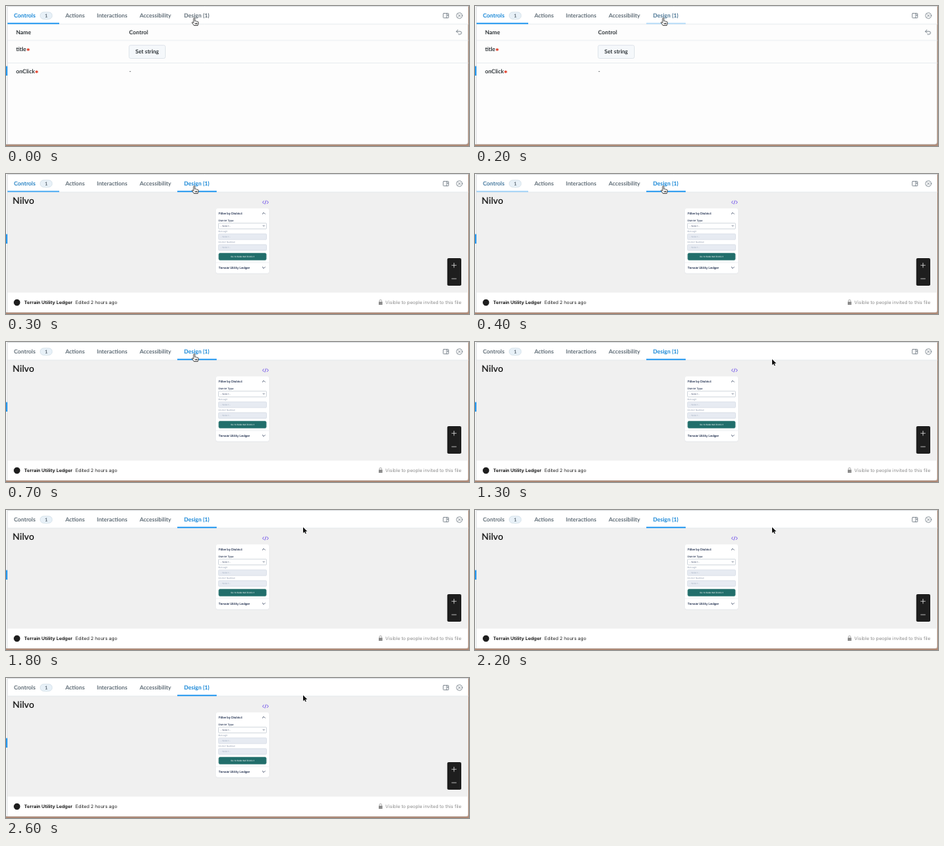
Recreate the animation shown at these times as an HTML page. Size 600 by 183 pixels, loop 2700 ms.

```html
<!DOCTYPE html>
<html lang="en">
<head>
<meta charset="utf-8">
<title>Addon panel</title>
<style>
  html, body { margin: 0; width: 100%; height: 100%; overflow: hidden; background: #fff; }
  svg { display: block; width: 600px; height: 183px; text-rendering: geometricPrecision; }
  .ui { font: 700 7.4px Lato, "Open Sans", sans-serif; fill: #2e3438; }
  .tabs { fill: #5f6c76; }
  .button { font-size: 7.2px; }
  .count { font-size: 6.4px; }
  .brand { font: 600 12px Lato, sans-serif; fill: #111; }
  .card { font: 600 4px Inter, sans-serif; fill: #1b2a4a; }
  .small { font-size: 3.15px; }
  .tiny { font-size: 2.9px; font-weight: 400; }
  .foot { font: 400 6.1px Inter, sans-serif; fill: #222; }
  .line { fill: none; stroke-linecap: round; stroke-linejoin: round; }
</style>
</head>
<body>
<svg viewBox="0 0 600 183">
  <rect width="600" height="183" fill="#b08a76"/>
  <path d="M0 0H599V178Q599 181 596 181H0Z" fill="#fdfdfd"/>
  <path d="M0 181H596Q599 181 599 178V0" class="line" stroke="#a0958f" stroke-width=".6"/>
  <rect x="2" width="597" height="24" fill="#fff"/>
  <path d="M1.7 180.6V.5H599" class="line" stroke="#d3d7da" stroke-width=".8"/>

  <g id="controlsView" class="ui">
    <path d="M2 45H599M2 74.5H599" class="line" stroke="#e3e8ec" stroke-width=".7"/>
    <text x="13" y="36.8">Name</text>
    <text x="159.5" y="36.8">Control</text>
    <text x="13" y="59.3">title</text>
    <text x="13" y="88.3">onClick</text>
    <g id="stars" class="line" stroke="#e0432f" stroke-width=".9"></g>
    <rect x="159.5" y="51.3" width="47" height="17.2" rx="2" fill="#f5f8fb" stroke="#d9e0e6" stroke-width=".7"/>
    <text x="183" y="62.4" text-anchor="middle" class="button">Set string</text>
    <text x="159.5" y="88" font-weight="400">-</text>
    <path d="M585.6 31.2 583.6 33.2 585.6 35.2M583.8 33.2H588.4A1.9 1.9 0 0 1 588.4 37H586.5" class="line" stroke="#66727b" stroke-width=".8"/>
  </g>

  <g id="designView">
    <rect x="2" y="23.8" width="597" height="131.2" fill="#f0f0f0"/>
    <rect x="2" y="155" width="596.5" height="25.6" fill="#fff"/>
    <text x="8.6" y="38.9" class="brand">Nilvo</text>
    <path d="M334.2 35.2 332.5 37 334.2 38.8M338.4 35.2 340.1 37 338.4 38.8M336.9 34.9 335.7 39.1" class="line" stroke="#6a4bea" stroke-width=".8"/>

    <rect x="271.6" y="45" width="69.8" height="85.4" rx="2.5" fill="#e4e6ea"/>
    <rect x="272" y="45" width="69" height="84.8" rx="2.2" fill="#fff"/>
    <path d="M272 115.8H341" class="line" stroke="#eceef2" stroke-width=".7"/>
    <g class="card">
      <text x="275.5" y="52.9">Filter by District</text>
      <text x="275.5" y="124.3">Terrain Utility Ledger</text>
      <text x="275.5" y="62.2" class="small">District Type</text>
      <g id="fields" class="tiny"></g>
      <rect x="275.5" y="103.2" width="62" height="9.6" rx="1.8" fill="#216e6b"/>
      <text x="306.5" y="109.1" class="tiny" text-anchor="middle" fill="#fff">Go to Selected District</text>
    </g>
    <path d="M332.3 52.2 334 50.5 335.7 52.2M332.3 121.7 334 123.4 335.7 121.7" class="line" stroke="#1b2a4a" stroke-width=".7"/>
    <path d="M333 67.3 334 68.4 335 67.3" class="line" stroke="#1b2a4a" stroke-width=".5"/>

    <rect x="571.8" y="110" width="18.2" height="36" rx="1.8" fill="#1e1e1e"/>
    <path d="M577.8 119.3H583.4M580.6 116.5V122.1M577.8 136.9H583.4" class="line" stroke="#e6e6e6" stroke-width=".7"/>

    <circle cx="14.2" cy="168" r="4.2" fill="#1e1e1e"/>
    <g class="foot">
      <text x="23.5" y="170.3" font-weight="700">Terrain Utility Ledger</text>
      <text x="90" y="170.3">Edited 2 hours ago</text>
      <text x="590" y="170.3" text-anchor="end" fill="#8c8c8c">Visible to people invited to this file</text>
    </g>
    <rect x="483" y="167" width="4.8" height="4" rx=".5" fill="#8c8c8c"/>
    <path d="M484 167V165.8A1.4 1.4 0 0 1 486.8 165.8V167" class="line" stroke="#8c8c8c" stroke-width=".7"/>
  </g>

  <path d="M2 23.7H599" class="line" stroke="#e1e6ea" stroke-width=".7"/>
  <rect y="78.6" width="1.8" height="12.4" fill="#1e96f0"/>

  <g class="ui tabs">
    <text id="controlsTab" x="10.3" y="15.2">Controls</text>
    <rect x="44.3" y="8" width="15.6" height="9.2" rx="4.6" fill="#e8f1f8" stroke="#cbd8e2" stroke-width=".6"/>
    <text x="52.1" y="15" text-anchor="middle" class="count">1</text>
    <text x="77" y="15.2">Actions</text>
    <text x="117.8" y="15.2">Interactions</text>
    <text x="173.2" y="15.2">Accessibility</text>
    <text id="designTab" x="230.7" y="15.2">Design (1)</text>
  </g>
  <rect id="controlsBar" x="2" y="21.9" width="67" height="1.7" fill="#1e96f0"/>
  <rect id="designBar" x="222" y="21.9" width="51" height="1.7"/>

  <g class="line" stroke="#66727b" stroke-width=".7">
    <rect x="566.6" y="9.6" width="7" height="6" rx=".7"/>
    <path d="M571 9.6V15.6M572 11.2H572.8M572 12.6H572.8"/>
    <circle cx="587.5" cy="12.6" r="3.7"/>
    <path d="M586.1 11.2 588.9 14M588.9 11.2 586.1 14"/>
  </g>

  <path id="hand" d="M-.9 .9Q-.9 0 0 0T.9 .9V4.2Q1.8 3.6 2.5 4.5 3.4 4 4 4.9 5.4 4.7 5.4 6.1 5.4 8 4.5 9.9H-.4Q-1.6 7.7-3.2 6.1-2.9 4.9-.9 6.3ZM1.2 6.6V8.5M2.5 6.6V8.5M3.8 6.6V8.5"
    fill="#fff" stroke="#222" stroke-width=".75" stroke-linejoin="round"/>
  <path id="arrow" d="M0 0V7.6L1.8 6 3 8.6 4.2 8 3 5.5H5.4Z" fill="#111" stroke="#fff" stroke-width=".5" paint-order="stroke"/>
</svg>
<script>
const LOOP = 2700, STEP = 100;
const BLUE = [20, 133, 214], GRAY = [95, 108, 118];
const $ = id => document.getElementById(id);
const mix = (a, b, k) => `rgb(${a.map((v, i) => Math.round(v + (b[i] - v) * k))})`;
const clamp = k => Math.min(1, Math.max(0, k));
const show = (id, on) => $(id).setAttribute('visibility', on ? 'visible' : 'hidden');

// time, x, y of the pointer tip
const path = [[700, 244, 15.6], [800, 247, 15.8], [900, 264, 15.8], [1000, 296.7, 15.9], [1100, 345, 19], [1200, 385, 22.4]];

function pointer(t) {
  const next = path.findIndex(p => p[0] > t);
  if (next === 0) return path[0].slice(1);
  if (next < 0) return path[path.length - 1].slice(1);
  const [a, b] = [path[next - 1], path[next]];
  const k = (t - a[0]) / (b[0] - a[0]);
  return [1, 2].map(i => a[i] + (b[i] - a[i]) * k);
}

function star(x, y) {
  return [30, 90, 150].map(a => `<path d="M-1.5 0H1.5" transform="translate(${x} ${y})rotate(${a})"/>`).join('');
}

function field(y, label, ink, fill, stroke) {
  return `<text x="275.5" y="${y - 2}" fill="#8b97ab">${label}</text>
    <rect x="275.5" y="${y}" width="62" height="7.6" rx="1" fill="${fill}" stroke="${stroke}" stroke-width=".45"/>
    <text x="278" y="${y + 4.8}" fill="${ink}">- Select -</text>`;
}

function render(time) {
  const t = Math.floor(time % LOOP / STEP) * STEP;
  const design = t >= 300;
  const [x, y] = pointer(t);
  const onTab = t < 1100;
  const controlsGlow = design ? clamp((500 - t) / 250) : 1;
  const designGlow = design ? 1 : t >= 200 ? 0.3 : 0;

  show('controlsView', !design);
  show('designView', design);
  $('controlsBar').setAttribute('opacity', controlsGlow);
  $('controlsTab').setAttribute('fill', mix(GRAY, BLUE, controlsGlow));
  $('designBar').setAttribute('opacity', designGlow);
  $('designBar').setAttribute('fill', '#1e96f0');
  $('designTab').setAttribute('fill', mix(GRAY, BLUE, designGlow));

  show('hand', onTab);
  show('arrow', !onTab);
  $(onTab ? 'hand' : 'arrow').setAttribute('transform', `translate(${x} ${y})`);
}

$('stars').innerHTML = star(28.8, 57) + star(39.8, 86);
$('fields').innerHTML = field(64.2, '', '#4a5570', '#fff', '#a2acba')
  + field(78.2, 'Borough', '#a5b0c2', '#e7ebf2', '#c3ccda')
  + field(92.3, 'District Number', '#a5b0c2', '#e7ebf2', '#c3ccda');

const start = performance.now();
function tick() {
  render(performance.now() - start);
  requestAnimationFrame(tick);
}
tick();
</script>
</body>
</html>
```
